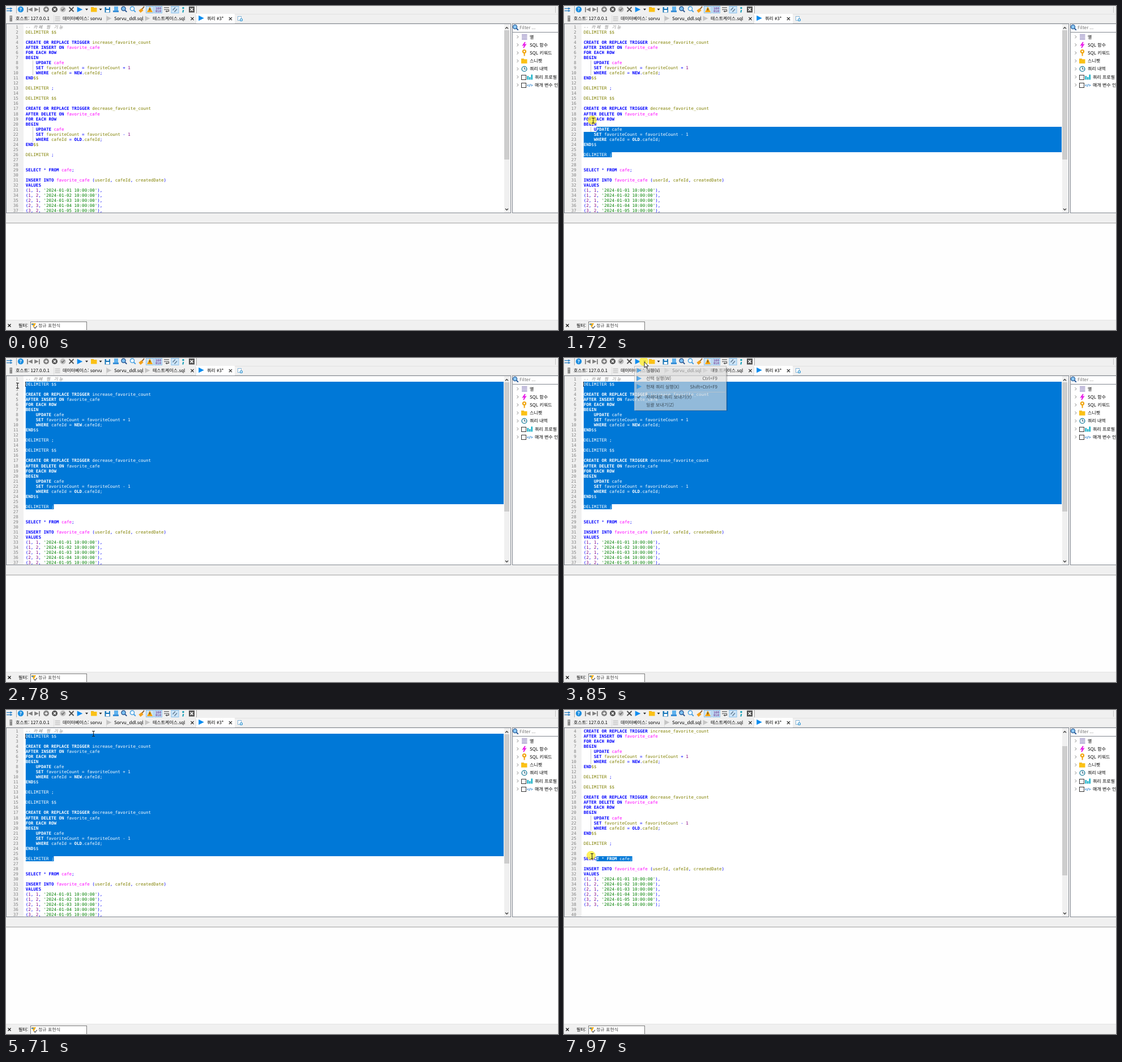
An HTML page with a canvas that plays this animation: 975 px wide and 574 px high, repeating every 8 s.

```html
<!DOCTYPE html>
<html lang="ko">
<head>
<meta charset="utf-8">
<title>SQL editor</title>
<style>
html, body { margin: 0; width: 975px; height: 574px; overflow: hidden; background: #f0f0f0; }
canvas { display: block; }
</style>
</head>
<body>
<canvas id="stage" width="975" height="574"></canvas>
<script>
(() => {
const ctx = document.getElementById('stage').getContext('2d');
const LOOP = 8000, CELL = 4.513, ROW = 9.03, X0 = 34.8, Y0 = 33;
const UI = '8px "Noto Sans CJK KR", "Noto Sans CJK", sans-serif';
const MONO = '7.5px "DejaVu Sans Mono", "Noto Sans CJK KR", monospace';
const BLUE = '#0a8cf0', DARK = '#505050', GRAY = '#808080', GOLD = '#fbc116';

const trigger = (name, event, op, row) => [
  `CREATE OR REPLACE TRIGGER ${name}_favorite_count`, `AFTER ${event} ON favorite_cafe`,
  'FOR EACH ROW', 'BEGIN', '    UPDATE cafe', `    SET favoriteCount = favoriteCount ${op} 1`,
  `    WHERE cafeId = ${row}.cafeId;`, 'END$$', '', 'DELIMITER ;'];
const pairs = ['1, 1', '1, 2', '2, 1', '2, 3', '3, 2', '3, 3'];
const code = ['-- 카페 찜 기능', 'DELIMITER $$', '', ...trigger('increase', 'INSERT', '+', 'NEW'),
  '', 'DELIMITER $$', '', ...trigger('decrease', 'DELETE', '-', 'OLD'), '', '',
  'SELECT * FROM cafe;', '', 'INSERT INTO favorite_cafe (userId, cafeId, createdDate)', 'VALUES',
  ...pairs.map((p, i) => `(${p}, '2024-01-0${i + 1} 10:00:00')${i < 5 ? ',' : ';'}`), '', '', ''];
const keywords = new Set(('CREATE OR REPLACE TRIGGER AFTER INSERT DELETE ON FOR EACH ROW BEGIN UPDATE ' +
  'SET WHERE END NEW OLD SELECT FROM INTO VALUES').split(' '));

// Moments that drive the scene
const ENTER = 190, DRAG = 990, DROP = 2780, OPEN = 3650, PICK = 4980, RUN = 5180;
const CLICK = 6570, SCROLL = 7040, DRAG2 = 7510, LAG = 40;
const presses = [[DRAG, DROP], [OPEN, 3920], [PICK, RUN], [CLICK, 6900], [DRAG2, LOOP]];

const easeIn = u => u ** 3;
const easeOut = u => 1 - (1 - u) ** 1.6;
const smooth = u => u * u * (3 - 2 * u);

// Cursor stops: arrival time, x, y, easing (smooth when left out)
const stops = [
  [ENTER, 921, 566], [780, 112, 243, easeOut], [DRAG, 89, 264], [1060, 89, 264],
  [1720, 51, 204, easeIn], [1990, 20, 88, easeOut], [2580, 20, 49, easeOut], [DROP, 20, 49],
  [3350, 162, 6], [3580, 142, 7], [3920, 142, 7], [4310, 153, 37], [RUN, 153, 37], [5440, 154, 41],
  [5680, 154, 41], [6440, 93, 262], [CLICK, 93, 265], [6900, 93, 265], [7370, 129, 275],
  [DRAG2, 126, 264], [8100, 38, 258]];

const clamp = (v, a, b) => Math.max(a, Math.min(b, v));
const within = (t, a, b) => t >= a && t < b;

function cursorAt(t) {
  const i = Math.max(1, stops.findIndex(s => s[0] > t));
  const [t0, x0, y0] = stops[i - 1], [t1, x1, y1, ease = smooth] = stops[i];
  const k = ease(clamp((t - t0) / (t1 - t0), 0, 1));
  return [x0 + (x1 - x0) * k, y0 + (y1 - y0) * k];
}

let skipped = 0; // lines scrolled away
const rowY = n => Math.round(Y0 + (n - 1 - skipped) * ROW);
const colX = c => X0 + c * CELL;

function rect(x, y, w, h, fill, stroke) {
  if (fill) { ctx.fillStyle = fill; ctx.fillRect(x, y, w, h); }
  if (stroke) { ctx.strokeStyle = stroke; ctx.lineWidth = 1; ctx.strokeRect(x + .5, y + .5, w - 1, h - 1); }
}
function trace(pts) {
  ctx.beginPath();
  for (let i = 0; i < pts.length; i += 2) ctx.lineTo(pts[i], pts[i + 1]);
}
function poly(fill, ...pts) { trace(pts); ctx.fillStyle = fill; ctx.fill(); }
function line(color, width, ...pts) {
  trace(pts); ctx.strokeStyle = color; ctx.lineWidth = width; ctx.stroke();
}
function disc(x, y, r, fill) {
  ctx.beginPath(); ctx.arc(x, y, r, 0, 7); ctx.fillStyle = fill; ctx.fill();
}
function ring(x, y, r, color, w) {
  ctx.beginPath(); ctx.arc(x, y, r, 0, 7); ctx.strokeStyle = color; ctx.lineWidth = w; ctx.stroke();
}
function text(s, x, y, color = '#000', font = UI, align = 'left') {
  ctx.font = font; ctx.fillStyle = color; ctx.textAlign = align; ctx.fillText(s, x, y);
}
const label = (s, x, mid, color, align) => text(s, x, mid + 2.9, color, UI, align);

// Small icons centred on x, y; a negative radius points the triangle left
const play = (x, y, r, c) => poly(c, x - r, y - r, x + r, y, x - r, y + r);
const plus = (x, y, r, c, w) => { line(c, w, x - r, y, x + r, y); line(c, w, x, y - r, x, y + r); };
const cross = (x, y, r, c, w) => { line(c, w, x - r, y - r, x + r, y + r); line(c, w, x + r, y - r, x - r, y + r); };
const drop = (x, y) => poly('#222', x - 2.5, y - 1.2, x + 2.5, y - 1.2, x, y + 1.8);
const tick = (x, y, c) => line(c, 1.2, x - 2.5, y, x - .7, y + 2, x + 2.8, y - 2.2);
const chevron = (x, y, dy) => line('#404040', 1.3, x - 2.5, y - dy, x, y, x + 2.5, y - dy);
const skip = (x, dir) => { play(x - dir, 6.2, 3.8 * dir, GRAY); rect(x + dir * 4 - 1, 2, 1.8, 9, GRAY); };
function folder(x, y) { rect(x - 5, y - 4, 5, 3, '#e8a80c'); rect(x - 5, y - 3, 10.5, 7.5, GOLD); }
function lens(x, y, c, fill) {
  disc(x - 1, y - 1, 3.6, fill); ring(x - 1, y - 1, 3.6, c, 1.3); line(c, 2, x + 1.8, y + 1.8, x + 4.8, y + 4.8);
}
function stack(x, y, w, h, step, c) { for (let i = 0; i < 3; i++) rect(x, y + i * step, w, h, c); }

function drawToolbar(busy) {
  for (const y of [4.5, 8.5]) { line('#2a7fc4', 1.3, 1, y, 10, y); play(9.5, y, 2, '#2a7fc4'); }
  for (const x of [18, 336]) rect(x, 0, 1, 13, '#a8a8a8');
  disc(26, 6, 5.2, '#1c8ee0'); text('?', 26, 9, '#fff', 'bold 8px "Open Sans", sans-serif', 'center');
  skip(42, -1); skip(55, 1);
  disc(71, 6, 5, GRAY); plus(71, 6, 2.6, '#fff', 1.4);
  disc(86, 6, 5, DARK); cross(86, 6, 2, '#fff', 1.4);
  disc(100.5, 6, 5, '#bcbcbc'); tick(100.5, 6, '#606060');
  cross(115.5, 6, 4, DARK, 1.8);
  play(130.5, 6.2, 4.8, BLUE); drop(142.5, 6);
  folder(155, 6); drop(167, 6);
  rect(174.5, 2, 9.5, 9.5, '#1976b8'); rect(177, 2, 5, 3, '#d9ecfa'); rect(176.5, 7, 6, 4, '#fff');
  rect(191, 1, 7, 7, '#5fb2ee'); rect(189, 8, 10, 3, '#3a8fd6');
  lens(208.5, 5.8, '#24508c', '#7cc0f2');
  lens(224, 5.8, '#3c9be0', '#eef7fd');
  line('#8a5a24', 1.8, 244, 1, 240, 6); line('#f2a01c', 5, 241, 6, 236, 10);
  for (const x of [247, 262, 291.5]) rect(x, 0, 14, 13, '#cce4f7', '#8fc3ec');
  poly('#f5a40c', 254, 1, 259, 11, 249, 11); line('#333', 1.2, 254, 4, 254, 8);
  ['160', '010'].forEach((s, i) =>
    text(s, 269, 5.6 + i * 5.8, '#6a3f98', 'bold 5.5px "DejaVu Sans Mono", monospace', 'center'));
  line(DARK, 1.2, 279, 3, 288, 3); line(DARK, 1.2, 279, 6.5, 287.5, 6.5, 287.5, 9.5, 283.5, 9.5);
  play(283, 9.5, -1.8, DARK);
  for (const d of [0, 3]) line('#5f7890', 1.4, 294.5 + d, 7.5 + d, 299 + d, 2.5 + d);
  disc(313, 3.5, 1.7, '#0e9bb4'); line('#0e9bb4', 2, 313.4, 7, 312.3, 11.5);
  rect(323, 1, 10, 10.5, busy ? '#d83030' : DARK); cross(328, 6.2, 2.4, '#fff', 1.5);
  rect(970, 1, 1, 11, '#c4c4c4');
}

function drawTabs() {
  rect(337, 14, 638, 1, '#e2e2e2');
  rect(0, 30, 975, 1, '#d9d9d9');
  for (const x of [84, 177, 241, 335]) rect(x, 16, 1, 14, '#dedede');
  rect(336, 14, 68, 17, '#fff');
  rect(6.5, 17, 4.5, 10.5, '#8c8c8c'); rect(7.5, 19, 2.5, 1, '#ddd');
  stack(86.5, 18, 9, 2.4, 3.2, '#d2d2d2');
  for (const x of [182, 250]) play(x, 22, 4.5, '#c4c4c4');
  for (const x of [329, 396.5]) cross(x, 22.5, 2.6, '#222', 1.2);
  play(345, 21.5, 4.8, BLUE);
  label('호스트: 127.0.0.1', 17, 22.5);
  label('데이터베이스: sorvu', 100, 22.5);
  label('Sorvu_ddl.sql', 191, 22.5);
  label('테스트케이스.sql', 259, 22.5);
  label('쿼리 #3*', 355, 22);
  rect(409, 18, 7, 8, '#fff', '#88b6d8'); disc(415.5, 24.5, 2.6, '#3a9ad4'); plus(415.5, 24.5, 1.6, '#fff', 1);
}

function drawSidePanel() {
  rect(894, 31, 82, 336, '#fff', '#828790');
  rect(894, 46, 81, 1, '#828790');
  lens(900, 38, '#2c5d98', '#8cc8f4');
  label('Filter ...', 907, 38.5, '#707070');
  const names = ['열', 'SQL 함수', 'SQL 키워드', '스니펫', '쿼리 내역', '쿼리 프로필', '매개 변수 인'];
  names.forEach((s, i) => {
    const y = 54.7 + i * 14.2;
    line('#808080', 1, 902.5, y - 2.5, 905, y, 902.5, y + 2.5);
    label(s, i > 4 ? 934 : 925, y);
    if (i > 4) rect(910, Math.round(y) - 4, 9, 9, '#fff', '#333');
  });
  stack(911, 50, 9.5, 2.8, 3.5, '#b9b2d6');
  line('#e818e8', 2, 917, 64, 913.5, 69.3, 917.5, 68.5, 914, 74);
  ring(915.5, 80.5, 2.5, '#f0a40c', 2.2); rect(914.6, 83, 2, 5.5, '#f0a40c');
  folder(915, 97.3);
  ring(915.5, 111.5, 4.4, '#1d7f9c', 1.4); line('#1d4f6c', 1, 915.5, 108.5, 915.5, 111.8, 918, 111.8);
  [6.5, 4.5, 9].forEach((h, i) => rect(920.5 + i * 3.5, 130.5 - h, 2.5, h, '#16b0c8'));
  text('</>', 925.3, 142.6, '#1a78c8', 'bold 7px "Open Sans", sans-serif', 'center');
}

function drawFooter() {
  rect(0, 384, 975, 1, '#a0a0a0');
  rect(0, 385, 975, 172, '#fefefe');
  rect(0, 556, 975, 1, '#e3e3e3');
  cross(6, 566, 2.5, '#111', 1.3);
  label('필터:', 22, 566.5);
  rect(43, 559, 100, 16, '#fff', '#7a7a7a');
  poly('#f2b020', 45, 562, 53, 562, 49, 570);
  rect(45, 563, 4, 2, '#4a90c8'); tick(52, 569, '#555');
  label('정규 표현식', 57, 566.5, '#444');
}

function styleOf(tok) {
  if (keywords.has(tok)) return ['#0000ff', 'bold '];
  if (/^(favorite_)?cafe$/.test(tok)) return ['#ff00ff', ''];
  if (tok[0] === "'") return ['#008000', ''];
  if (/^\d/.test(tok)) return ['#800080', ''];
  return [/^[\w$]/.test(tok) ? '#808000' : '#0000ff', ''];
}

function drawLine(s, y, color) {
  let col = 0;
  if (s.startsWith('--')) {
    for (const ch of s) {
      text(ch, colX(col), y, color || GRAY, 'italic ' + MONO);
      col += ch > '\u1100' ? 2 : 1;
    }
    return;
  }
  for (const tok of s.match(/'[^']*'|\w+|\$\$|\s+|./g) || []) {
    const [c, weight] = styleOf(tok);
    if (tok.trim()) text(tok, colX(col), y, color || c, weight + MONO);
    col += tok.length;
  }
}

function drawCode(color) {
  for (let n = skipped + 1; n <= skipped + 37; n++) drawLine(code[n - 1], rowY(n) + 7.2, color);
}

// Line and column nearest to a point
function hit([x, y]) {
  const n = clamp(Math.floor((y - Y0) / ROW) + 1 + skipped, 1, code.length);
  return [n, clamp(Math.round((x - X0) / CELL), 0, code[n - 1].length)];
}

// The selection trails the cursor a little
function selection(t) {
  if (within(t, DRAG, CLICK)) return [hit(cursorAt(clamp(t - LAG, DRAG, DROP))), [26, 11]];
  if (t >= DRAG2) return [hit(cursorAt(Math.max(DRAG2, t - LAG))), [29, 19]];
  return null;
}

function drawSelection([[l1, c1], [l2, c2]]) {
  ctx.save();
  ctx.beginPath();
  for (let n = l1; n <= l2; n++) {
    const a = n === l1 ? colX(c1) : X0, b = n === l2 ? colX(c2) : 879;
    if (b > a) ctx.rect(a, rowY(n), b - a, rowY(n + 1) - rowY(n));
  }
  ctx.clip();
  rect(0, 0, 880, 367, '#0078d7');
  drawCode('#fff');
  ctx.restore();
}

function drawCaret(t) {
  if (within(t, CLICK, DRAG2)) rect(84, rowY(26), 1, 9, '#000');
  const since = t - (t < PICK ? DROP : RUN + 60);
  const free = within(t, DROP, 4300) || within(t, RUN + 60, CLICK);
  if (free && Math.floor(since / 530) % 2 === 0) rect(34, rowY(2), 1, 9, '#10243a');
}

function drawEditor(t) {
  rect(0, 31, 892, 336, '#fff', '#828790');
  ctx.save();
  ctx.beginPath(); ctx.rect(1, 32, 889, 334); ctx.clip();
  rect(1, 32, 30, 334, '#f0f0f0');
  for (let n = skipped + 1; n <= skipped + 37; n++) text(n, 21.8, rowY(n) + 7.2, GRAY, MONO, 'right');
  for (const n of [8, 21]) rect(47, rowY(n), 1, rowY(n + 3) - rowY(n), '#c8c8c8');
  drawCode();
  const sel = selection(t);
  if (sel) drawSelection(sel);
  drawCaret(t);
  rect(880, 32, 10, 334, '#f0f0f0');
  rect(880, 43 + skipped * 7, 9, 229, '#cdcdcd');
  chevron(884.5, 37.7, -2.5);
  chevron(884.5, 361.5, 2.5);
  ctx.restore();
}

const menuAlpha = t => clamp((t - OPEN - 80) / 200, 0, 1) * clamp((RUN + 200 - t) / 200, 0, 1);

function drawMenu(alpha, cx, cy) {
  ctx.save();
  ctx.globalAlpha = alpha;
  rect(127, 17, 162, 77, 'rgba(0,0,0,.25)');
  rect(124, 14, 163, 79, '#f2f2f2', '#a0a0a0');
  const items = [['실행(V)', 'F9'], ['선택 실행(W)', 'Ctrl+F9'], ['현재 쿼리 실행(X)', 'Shift+Ctrl+F9'],
    ['차례대로 쿼리 보내기(Y)', ''], ['일괄 보내기(Z)', '']];
  items.forEach(([name, key], i) => {
    const y = 22 + i * 14.3 + (i > 2 ? 4 : 0);
    if (cx > 124 && Math.abs(cy - y) < 7.1) rect(126, Math.round(y - 7), 159, 14, '#91c9f7');
    label(name, 145, y);
    label(key, 271, y, '#000', 'right');
    if (i === 1 || i === 2) rect(127.5, y - 4, 3, 8, '#7d9cb8');
    if (i < 3) play(133, y, 4.2, BLUE);
  });
  rect(144, 60, 141, 1, '#c8c8c8');
  tick(132, 69, '#222');
  ctx.restore();
}

function drawPointer(t, x, y, menuOpen) {
  if (presses.some(([a, b]) => within(t, a, b))) disc(x - 1, y - 1, 8, 'rgba(255,238,40,.75)');
  if (menuOpen || y < 32 || y > 366 || x > 891) {
    ctx.save();
    ctx.translate(x, y);
    const shape = [0, 0, 0, 10, 2.3, 7.9, 4, 11.4, 5.6, 10.7, 4, 7.3, 7.2, 7.3, 0, 0];
    poly('#fff', ...shape); line('#111', .9, ...shape);
    ctx.restore();
  } else {
    x = Math.round(x) + .5; y = Math.round(y);
    line('#222', 1, x, y - 5, x, y + 5);
    for (const d of [-4.5, 4.5]) line('#222', 1, x - 2.5, y + d, x + 2.5, y + d);
  }
}

function draw(t) {
  skipped = t >= SCROLL ? 3 : 0;
  ctx.textRendering = 'geometricPrecision';
  rect(0, 0, 975, 574, '#f0f0f0');
  drawToolbar(within(t, RUN + 60, 5440));
  drawTabs();
  drawEditor(t);
  drawSidePanel();
  drawFooter();
  const [x, y] = cursorAt(t), alpha = menuAlpha(t);
  if (alpha > 0) drawMenu(alpha, x, y);
  if (t >= ENTER) drawPointer(t, x, y, alpha > 0);
}

function frame() {
  draw(performance.now() % LOOP);
  requestAnimationFrame(frame);
}
frame();
})();
</script>
</body>
</html>
```
